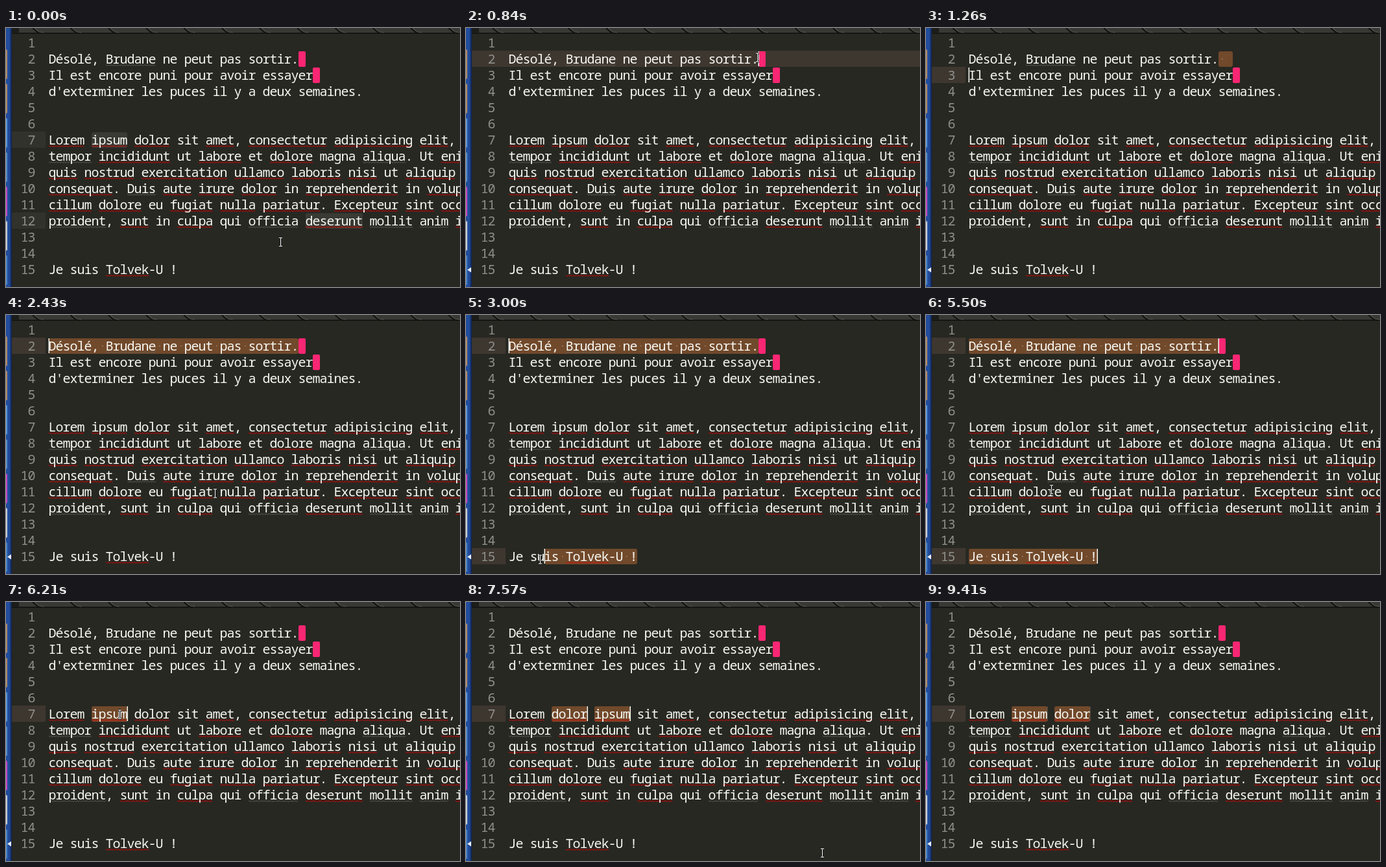
These frames come from a looping animation (700x400 px, 9.44 s). An HTML page with a canvas:

```html
<!DOCTYPE html>
<html lang="fr">
<head>
<meta charset="utf-8">
<title>Multiple selections</title>
<style>
  html, body { margin: 0; width: 100%; height: 100%; overflow: hidden; background: #272822; }
  canvas { display: block; }
</style>
</head>
<body>
<canvas id="stage" width="700" height="400"></canvas>
<script>
const ctx = document.getElementById('stage').getContext('2d');
const LOOP = 9440, LEFT = 66, CHAR = 11, ROW = 25;
const FONT = '20px "Noto Sans Mono", "DejaVu Sans Mono", monospace';

const SORRY = 'Désolé, Brudane ne peut pas sortir.';
const ROBOT = 'Je suis Tolvek-U !';
const LINES = [
  '', SORRY + ' ',
  'Il est encore puni pour avoir essayer ',
  "d'exterminer les puces il y a deux semaines.",
  '', '',
  'Lorem ipsum dolor sit amet, consectetur adipisicing elit, sed',
  'tempor incididunt ut labore et dolore magna aliqua. Ut enim ad',
  'quis nostrud exercitation ullamco laboris nisi ut aliquip ex',
  'consequat. Duis aute irure dolor in reprehenderit in voluptate',
  'cillum dolore eu fugiat nulla pariatur. Excepteur sint occaecat',
  'proident, sunt in culpa qui officia deserunt mollit anim id',
  '', '', ROBOT
];
const SPELL_OK = new Set('ut Ut et in sit magna qui eu est Je suis U'.split(' '));
const SPELL_FAINT = new Set('Brudane tempor aliqua proident officia mollit anim Duis'.split(' '));

const colX = col => LEFT + col * CHAR;
const rowY = row => row * ROW - 15;
const clamp = v => Math.max(0, Math.min(1, v));
const smooth = v => { v = clamp(v); return v * v * (3 - 2 * v); };

// Pointer tracks: [time, x, y]; the pointer is hidden between tracks.
const TRACKS = [
  [[0, 423, 330], [40, 420, 325], [230, 331, 190], [480, 449, 45], [1100, 449, 45]],
  [[2140, 449, 45], [2600, 266, 377], [2740, 266, 377], [3000, 114, 377],
   [3060, 106, 376], [3360, 68, 375], [3520, 68, 375], [3760, 90, 412]],
  [[5180, 215, 388], [5780, 175, 173], [6210, 175, 173], [6590, 231, 173],
   [6960, 231, 173], [7570, 549, 387], [8380, 549, 387], [8700, 545, 412]]
];

function pointerAt(t) {
  const track = TRACKS.find(p => t >= p[0][0] && t < p[p.length - 1][0]);
  if (!track) return null;
  const i = track.findIndex(p => p[0] > t);
  const [t0, x0, y0] = track[i - 1], [t1, x1, y1] = track[i];
  const k = smooth((t - t0) / (t1 - t0));
  return [x0 + (x1 - x0) * k, y0 + (y1 - y0) * k];
}

// A selection runs from anchor to caret, both columns of one row.
const sel = (row, anchor, caret) => ({ row, anchor, caret });
const lineTwo = sel(2, 35, 0), ipsum = sel(7, 6, 11), dolor = sel(7, 12, 17);
const swappedLines = { 2: ROBOT + ' ', 15: SORRY };
const swappedWords = { 7: LINES[6].replace('ipsum dolor', 'dolor ipsum') };

function dragged(t) {
  const [x] = pointerAt(t - 30);
  const col = Math.round((x + 2 - LEFT) / CHAR);
  return [lineTwo, sel(15, 18, Math.max(0, Math.min(18, col)))];
}

const STAGES = [
  { at: 0, sels: [ipsum, sel(12, 36, 44)], idle: true },
  { at: 770, sels: [sel(2, 35, 35)] },
  { at: 1100, sels: [sel(2, 35, 36)] },
  { at: 1260, sels: [{ ...sel(2, 35, 37), caretRow: 3, caretCol: 0 }] },
  { at: 1830, sels: [lineTwo] },
  { at: 2600, sels: [lineTwo, sel(15, 18, 18)] },
  { at: 2770, sels: dragged },
  { at: 3360, sels: [lineTwo, sel(15, 18, 0)] },
  { at: 3590, sels: [sel(2, 0, 18), sel(15, 0, 35)], text: swappedLines },
  { at: 5060, sels: [sel(2, 0, 35), sel(15, 0, 18)] },
  { at: 5920, sels: [sel(7, 10, 10)] },
  { at: 6210, sels: [ipsum] },
  { at: 6750, sels: [ipsum, sel(7, 15, 15)] },
  { at: 6900, sels: [ipsum, dolor] },
  { at: 7300, sels: [ipsum, dolor], text: swappedWords },
  { at: 7780, sels: [ipsum, dolor], fadeIn: true }
];

function caretAlpha(age, fadeIn) {
  if (age < 600) return fadeIn ? smooth(age / 400) : 1;
  return age < 1540 ? 1 - smooth((age - 600) / 400) : smooth((age - 1540) / 400);
}

function fill(color, x, y, w, h, radius = 0) {
  ctx.fillStyle = color;
  ctx.beginPath();
  ctx.roundRect(x, y, w, h, radius);
  ctx.fill();
}

function stroke(color, width, points) {
  ctx.strokeStyle = color;
  ctx.lineWidth = width;
  ctx.beginPath();
  for (const [x, y] of points) ctx.lineTo(x, y);
  ctx.stroke();
}

function drawText(text, x, y, color) {
  ctx.fillStyle = color;
  [...text].forEach((c, i) => {
    if (c !== ' ') ctx.fillText(c, x + (i + 0.5) * CHAR, y);
  });
}

function drawSquiggles(row, text) {
  if (row < 7 && row !== 2 && row !== 15) return;
  for (const { 0: word, index } of text.matchAll(/\p{L}+/gu)) {
    const faint = SPELL_FAINT.has(word);
    const latin = row >= 7 && row <= 12;
    if (SPELL_OK.has(word) || !(latin || faint || word === 'Tolvek')) continue;
    const wave = [];
    for (let x = 0; x <= word.length * CHAR; x += 2)
      wave.push([colX(index) + x, rowY(row) + (x % 4 ? 23.5 : 21.5)]);
    stroke(faint ? '#62625b' : '#e60000', 1, wave);
  }
}

function drawChrome(focused) {
  fill('#272822', 0, 0, 700, 400);
  fill('#1c1d1a', 9, 0, 691, 9);
  fill('#383934', 20, 0, 680, 7);
  for (let x = 48; x < 700; x += 58.3) {
    stroke('#11120f', 2, [[x - 7, 0], [x, 6], [x + 8, 8]]);
    stroke('#5a5b55', 1, [[x - 4, 0], [x + 3, 6], [x + 10, 7]]);
  }
  stroke('#11120f', 1, [[9, 8.5], [700, 8.5]]);
  fill('#173572', 0, 0, 9, 400);
  fill('#224d9c', 0, 0, 6, 400);
  ['#b08a68', '#b08a68', '#5b96d4', '#5b8fc4', '#c34bc0', '#c9ced6', '#4c86c6']
    .forEach((color, i) => fill(color, -3, 33 + i * 53, 5, 46, 2));
  fill('#10204a', 8, 0, 1, 400);
  if (focused) {
    ctx.fillStyle = '#e8ecf4';
    ctx.beginPath();
    ctx.moveTo(2, 373.5);
    ctx.lineTo(8, 369.5);
    ctx.lineTo(8, 377.5);
    ctx.fill();
  }
}

function drawPointer([x, y]) {
  x = Math.round(x) + 0.5;
  y = Math.round(y) + 0.5;
  for (const [color, width] of [['#000', 3], ['#fff', 1.2]]) {
    stroke(color, width, [[x, y - 6], [x, y + 6]]);
    for (const end of [-6.5, 6.5]) stroke(color, width, [[x - 2.5, y + end], [x + 2.5, y + end]]);
  }
}

function draw(t) {
  const stage = STAGES.findLast(s => s.at <= t);
  const sels = typeof stage.sels === 'function' ? stage.sels(t) : stage.sels;
  const dragging = stage.sels === dragged;
  const selected = (row, col) => sels.some(s =>
    s.row === row && col >= Math.min(s.anchor, s.caret) && col < Math.max(s.anchor, s.caret));

  drawChrome(!stage.idle);
  for (const s of sels) {
    const empty = s.anchor === s.caret;
    fill(stage.idle ? '#31322c' : '#3e372f', 9, rowY(s.caretRow || s.row), empty ? 691 : 52, ROW);
  }
  for (const s of sels) {
    const from = Math.min(s.anchor, s.caret), to = Math.max(s.anchor, s.caret);
    if (to > from)
      fill(stage.idle ? '#393a34' : '#71492b', colX(from), rowY(s.row) + 1, (to - from) * CHAR, 24, 3);
  }

  ctx.font = FONT;
  ctx.textAlign = 'center';
  LINES.forEach((line, i) => {
    const row = i + 1, y = rowY(row);
    const text = stage.text?.[row] ?? line;
    const last = text.length - 1;
    const trailing = text[last] === ' ';
    if (trailing && !selected(row, last)) fill('#fb2673', colX(last), y + 1, CHAR, 24, 2);
    [...text].forEach((c, col) => {
      const marked = !stage.idle && selected(row, col);
      if (c === ' ' && (marked || (trailing && col === last)))
        fill(marked ? '#aa8a70' : '#b0547a', colX(col) + 5, y + 12, 1.5, 1.5);
    });
    const label = String(row);
    drawText(label, 45 - label.length * CHAR, y + 20, '#8f908a');
    drawSquiggles(row, text);
    drawText(text, LEFT, y + 20, '#f8f8f2');
  });

  if (!stage.idle) {
    ctx.globalAlpha = dragging ? 1 : caretAlpha(t - stage.at, stage.fadeIn);
    for (const s of sels)
      fill('#f8f8f0', colX(s.caretCol ?? s.caret) - 0.5, rowY(s.caretRow || s.row) + 1, 1.5, 23);
    ctx.globalAlpha = 1;
  }
  const pointer = pointerAt(t);
  if (pointer) drawPointer(pointer);
}

const start = performance.now();
function frame() {
  draw((performance.now() - start) % LOOP);
  requestAnimationFrame(frame);
}
frame();
</script>
</body>
</html>
```
